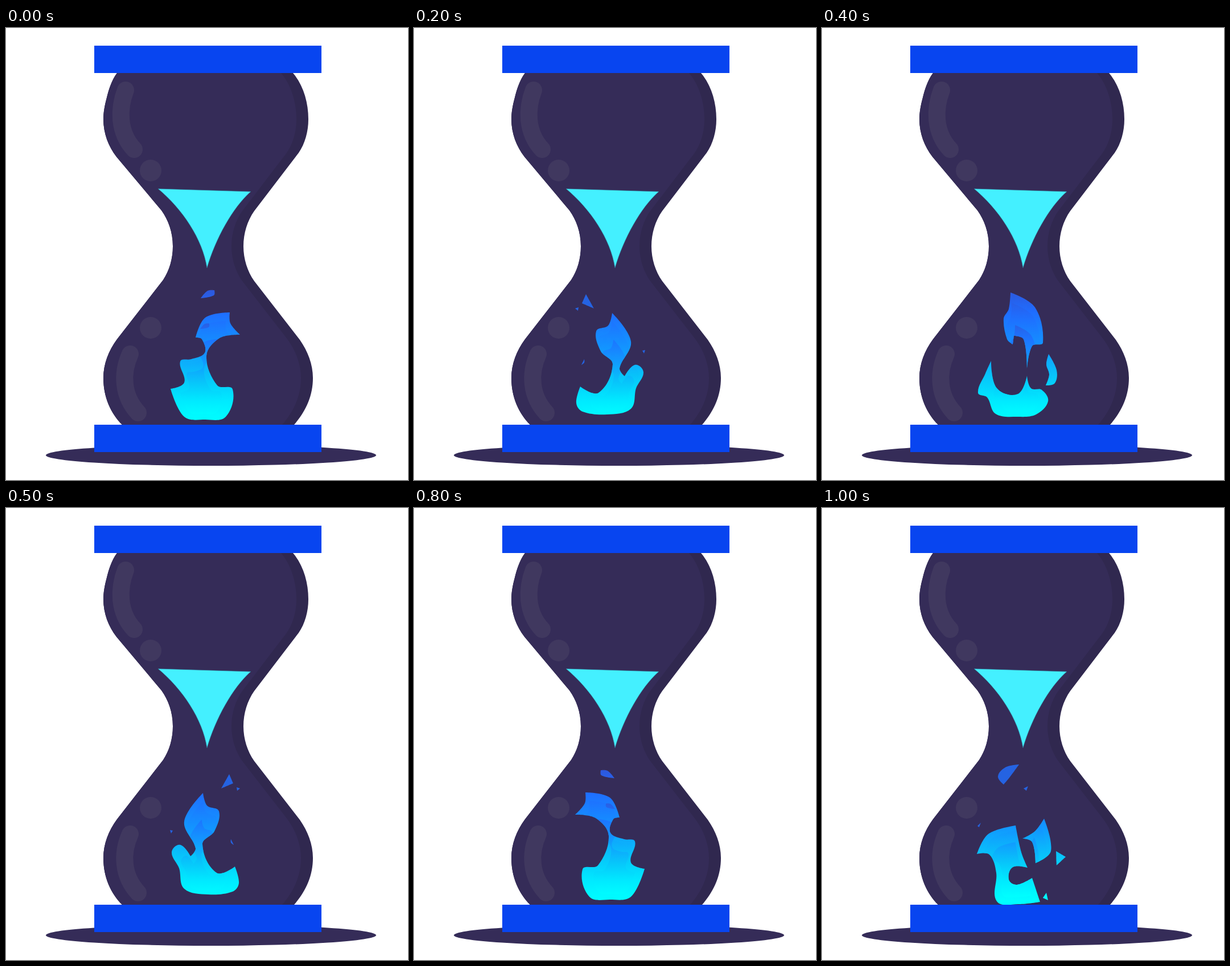
Animation of 706 by 793 pixels, one loop 1100 ms. Source, as an HTML page:

```html
<!DOCTYPE html>
<html>
<head>
<meta charset="utf-8">
<title>Hourglass flame</title>
<style>
html, body { margin: 0; width: 100%; height: 100%; overflow: hidden; background: #fff; }
svg { display: block; width: 100vw; height: 100vh; }
.gloss { fill: #40385f; }
.streak { fill: none; stroke: #40385f; stroke-width: 30; stroke-linecap: round; }
</style>
</head>
<body>
<svg viewBox="0 0 706 793">
  <defs>
    <linearGradient id="heat" gradientUnits="userSpaceOnUse" x1="0" y1="450" x2="0" y2="692">
      <stop offset="0" stop-color="#3152d2"/>
      <stop offset=".2" stop-color="#1f6dff"/>
      <stop offset=".45" stop-color="#1296ff"/>
      <stop offset=".65" stop-color="#08c2fa"/>
      <stop offset=".85" stop-color="#00ebff"/>
      <stop offset="1" stop-color="#00ffff"/>
    </linearGradient>
    <linearGradient id="glow" gradientUnits="userSpaceOnUse" x1="0" y1="595" x2="0" y2="640">
      <stop offset="0" stop-color="#a0ffff" stop-opacity="0"/>
      <stop offset="1" stop-color="#a0ffff"/>
    </linearGradient>
    <path id="glass" d="M195 79C185 92 180 110 177 122C173 137 171 148 171 160C171 185 180 208 194 226L273 320C285 337 293 358 293 383C293 405 287 425 276 442L195 546C180 566 171 590 171 614C171 648 184 676 204 696H506C527 672 539 645 539 614C539 590 530 567 516 547L436 444C424 427 417 405 417 383C417 360 424 338 436 321L514 219C525 203 531 182 531 160C531 130 522 100 504 79Z"/>
    <clipPath id="inside"><use href="#glass"/></clipPath>
    <clipPath id="within"><use href="#body"/></clipPath>
  </defs>
  <ellipse cx="360" cy="749.5" rx="290" ry="18.5" fill="#352c58"/>
  <use href="#glass" fill="#30284f"/>
  <g clip-path="url(#inside)"><use href="#glass" x="-21" fill="#352c58"/></g>
  <path class="streak" d="M210 109C198 140 196 182 225 213"/>
  <circle class="gloss" cx="254" cy="250" r="19"/>
  <circle class="gloss" cx="254" cy="526" r="19"/>
  <path class="streak" d="M218 572C203 605 204 645 232 675"/>
  <path fill="#44f0ff" stroke="#2f6f8c" stroke-opacity=".6" d="M267 282L430 287C398 315 368 370 353 421C345 370 310 318 267 282Z"/>
  <g id="flame">
    <path id="body" fill="url(#heat)"/>
    <path id="ember" fill="#2563e2"/>
    <g clip-path="url(#within)" fill="url(#glow)">
      <use href="#body" opacity=".5" transform="translate(345 684) scale(.86 .9) translate(-345 -688)"/>
      <use href="#body" opacity=".75" transform="translate(343 678) scale(.66 .7) translate(-345 -688)"/>
    </g>
  </g>
  <path fill="#0845f0" d="M155 31H554V79H155ZM155 696H554V744H155Z"/>
</svg>
<script>
const $ = id => document.getElementById(id);

// Closed smooth outline through the points; turns over 90 degrees stay sharp.
function blob(...xy) {
  const n = xy.length / 2;
  const at = i => { const k = (i + n) % n * 2; return [xy[k], xy[k + 1]]; };
  const handle = (i, toward) => {
    const [ax, ay] = at(i - 1), [x, y] = at(i), [bx, by] = at(i + 1);
    if ((x - ax) * (bx - x) + (y - ay) * (by - y) < 0) return [x, y];
    const [tx, ty] = at(i + toward);
    const reach = toward * Math.hypot(tx - x, ty - y) / 3 / Math.hypot(bx - ax, by - ay);
    return [x + (bx - ax) * reach, y + (by - ay) * reach];
  };
  let d = 'M' + at(0);
  for (let i = 0; i < n; i++) d += 'C' + [handle(i, 1), handle(i + 1, -1), at(i + 1)];
  return d + 'Z';
}

function swirl() {
  return {
    body: blob(333, 543, 350, 508, 393, 499, 394, 518, 411, 538, 375, 544, 352, 575, 371, 627, 398, 634, 386, 682, 350, 687, 313, 682, 289, 633, 313, 622, 306, 585, 325, 581, 349, 570, 344, 546)
      + blob(342, 474, 354, 461, 366, 460, 365, 469)
  };
}

function hook() {
  return {
    body: blob(278, 573, 301, 537, 356, 513, 340, 550, 361, 597, 322, 590, 304, 622, 320, 655, 355, 634, 382, 681, 345, 687, 307, 684, 295, 648, 301, 612),
    ember: blob(360, 548, 374, 539, 401, 529, 402, 560, 380, 581)
      + blob(324, 430, 341, 420, 332, 434) + blob(404, 594, 413, 588, 409, 600)
  };
}

function bowl() {
  return {
    body: blob(285, 625, 301, 626, 302, 574, 320, 580, 346, 580, 356, 616, 386, 624, 387, 604, 402, 640, 381, 691, 345, 694, 310, 690, 286, 652)
      + blob(349, 566, 359, 538, 379, 511, 407, 537, 415, 555, 399, 558, 402, 546, 376, 539),
    ember: blob(333, 457, 342, 453, 339, 457)
  };
}

function splash() {
  return {
    body: blob(346, 500, 353, 522, 374, 532, 366, 567, 345, 590, 370, 640, 402, 629, 409, 658, 398, 673, 355, 678, 313, 668, 304, 632, 291, 604, 306, 591, 324, 611, 333, 597, 313, 550),
    ember: blob(378, 492, 392, 467, 399, 483) + blob(405, 490, 411, 492, 406, 496)
      + blob(395, 581, 400, 591, 395, 587) + blob(288, 565, 293, 566, 290, 571)
  };
}

function crown() {
  return {
    body: blob(306, 552, 320, 490, 363, 464, 366, 493, 375, 510, 369, 546, 359, 555, 357, 540, 340, 546, 334, 598, 325, 558)
      + blob(296, 572, 282, 600, 285, 623, 301, 627, 295, 608, 300, 590)
      + blob(297, 655, 308, 635, 327, 632, 334, 610, 350, 642, 387, 632, 397, 584, 407, 606, 420, 640, 404, 648, 389, 677, 350, 682, 318, 678)
  };
}

function fork() {
  return {
    body: blob(274, 636, 288, 604, 325, 584, 335, 640, 330, 662, 361, 664, 367, 612, 350, 600, 372, 567, 387, 545, 402, 577, 427, 607, 412, 630, 407, 619, 376, 632, 377, 691, 343, 695, 309, 690, 306, 652)
      + blob(298, 490, 322, 460, 363, 450, 336, 484, 324, 510, 312, 494),
    ember: blob(359, 506, 361, 490, 372, 488) + blob(356, 525, 357, 517, 364, 516)
      + blob(273, 594, 277, 574, 286, 570, 285, 585)
  };
}

function wisps() {
  return {
    body: blob(272, 607, 292, 572, 340, 557, 350, 604, 361, 631, 335, 630, 328, 652, 342, 661, 369, 649, 383, 691, 345, 695, 307, 690, 306, 640, 294, 608)
      + blob(352, 580, 374, 567, 390, 545, 402, 602, 375, 623, 369, 586)
      + blob(411, 602, 428, 612, 412, 627) + blob(388, 684, 394, 675, 397, 688),
    ember: blob(309, 471, 322, 455, 346, 450, 330, 472, 319, 485)
      + blob(354, 492, 362, 488, 359, 496) + blob(273, 558, 279, 552, 276, 560)
  };
}

const mirror = pose => () => ({ ...pose(), flip: true });
const poses = [swirl, hook, mirror(splash), bowl, mirror(crown), splash, mirror(bowl), crown, mirror(swirl), fork, wisps];
const STEP = 100;

function draw() {
  const { body, ember = '', flip } = poses[Math.floor(performance.now() / STEP) % poses.length]();
  $('body').setAttribute('d', body);
  $('ember').setAttribute('d', ember);
  $('flame').setAttribute('transform', flip ? 'translate(694) scale(-1 1)' : '');
  requestAnimationFrame(draw);
}
draw();
</script>
</body>
</html>
```
